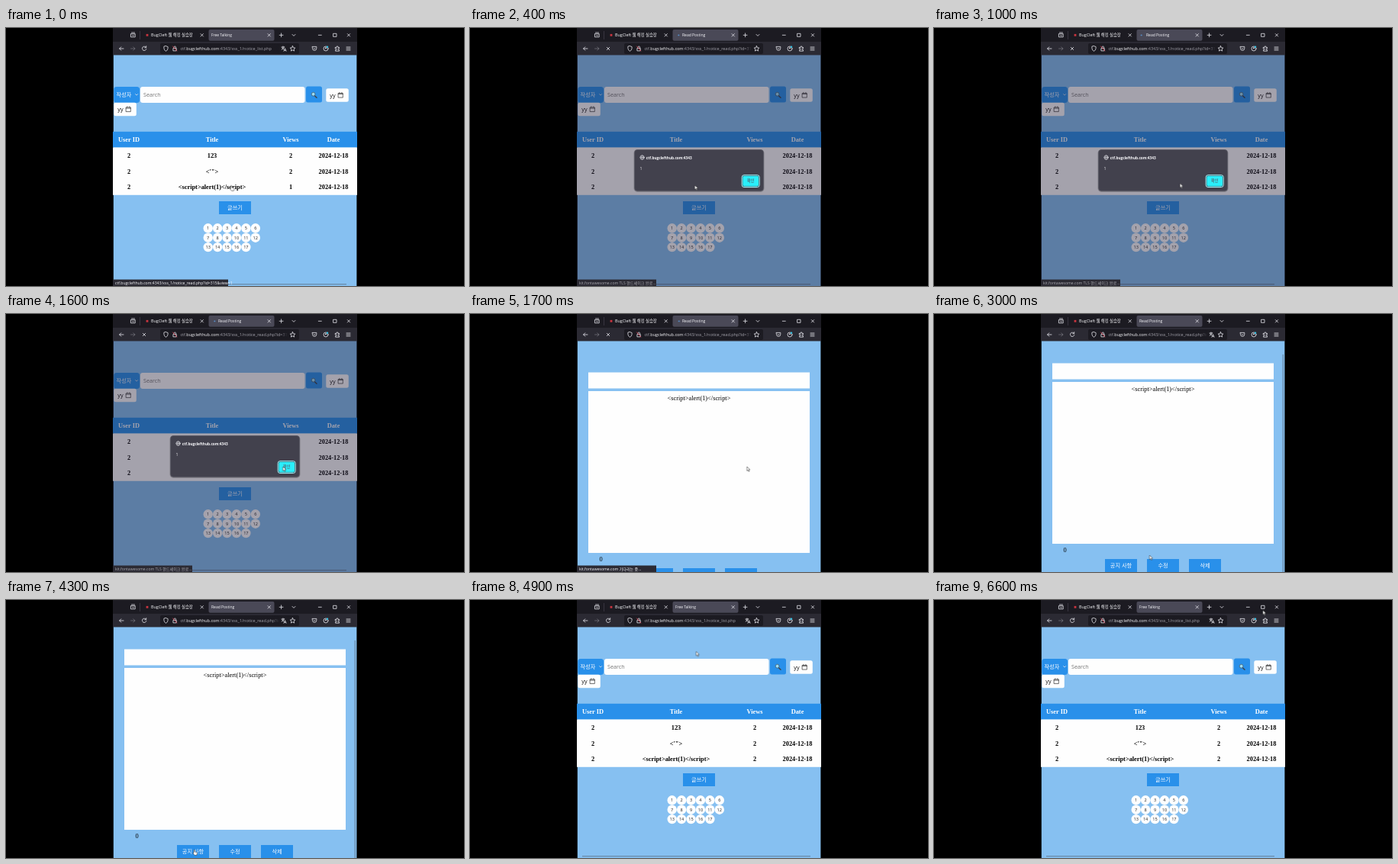
An HTML page that plays this animation: 600x338 px, repeating every 6.9 s.

```html
<!DOCTYPE html>
<html lang="ko">
<head>
<meta charset="utf-8">
<title>Free Talking</title>
<style>
html, body { margin: 0; width: 100%; height: 100%; overflow: hidden; background: #000; }
svg { display: block; width: 100vw; height: 100vh; }
text { font: 5.2px "Open Sans", "Noto Sans CJK KR", "Noto Sans CJK", sans-serif; fill: #fbfbfe; }
.mid { text-anchor: middle; }
.serif { font: 8.35px "Liberation Serif", "Times New Roman", serif; fill: #000; }
.bold { font-weight: 700; }
.head text { fill: #fff; }
.ko { font: 7.2px "Noto Sans CJK KR", "Noto Sans CJK", sans-serif; }
.field { font: 7.2px "Open Sans", sans-serif; fill: #757575; }
.num { font: 5.6px "Open Sans", sans-serif; fill: #222; }
.url { font-size: 5.47px; fill: #a5a4ad; }
.url tspan { fill: #fbfbfe; }
.status { font-size: 5.1px; }
.blue { fill: #2990ea; }
.sky { fill: #86c0f1; }
.white { fill: #fefefe; }
.bar { fill: #2b2a33; }
.dark { fill: #1c1b22; }
.line { fill: none; stroke: #e6e6ec; stroke-width: .8; stroke-linecap: round; stroke-linejoin: round; }
.pointer { fill: #fff; stroke: #222; stroke-width: .5; stroke-linejoin: round; }

/* Hard switches between browser states */
.idle, .hover, .alert, .load, .ready, .list, .read, .visit, .done, .arrow, .hand, .first, .again {
  animation: 6900ms step-end infinite;
}
.idle  { animation-name: idle; }
.hover { animation-name: hover; }
.alert { animation-name: alert; }
.load  { animation-name: load; }
.ready { animation-name: ready; }
.list  { animation-name: list; }
.read  { animation-name: read; }
.visit { animation-name: visit; }
.done  { animation-name: done; }
.arrow { animation-name: arrow; }
.hand  { animation-name: hand; }
.first { animation-name: first; }
.again { animation-name: again; }
@keyframes idle  { 0%, 71.014%, 100% { opacity: 1 } 5.797% { opacity: 0 } }
@keyframes hover { 0% { opacity: 1 } 5.797%, 100% { opacity: 0 } }
@keyframes alert { 0%, 24.638%, 100% { opacity: 0 } 5.797% { opacity: 1 } }
@keyframes load  { 0%, 30.435%, 100% { opacity: 0 } 5.797% { opacity: 1 } }
@keyframes ready { 0%, 30.435%, 100% { opacity: 1 } 5.797% { opacity: 0 } }
@keyframes list  { 0%, 71.014%, 100% { opacity: 1 } 24.638% { opacity: 0 } }
@keyframes read  { 0%, 71.014%, 100% { opacity: 0 } 24.638% { opacity: 1 } }
@keyframes visit { 0%, 71.014%, 100% { opacity: 0 } 5.797% { opacity: 1 } }
@keyframes done  { 0%, 71.014%, 100% { opacity: 0 } 30.435% { opacity: 1 } }
@keyframes first { 0% { opacity: 1 } 24.638%, 100% { opacity: 0 } }
@keyframes again { 0% { opacity: 0 } 24.638%, 100% { opacity: 1 } }
@keyframes arrow { 0%, 47.826% { opacity: 0 } 5.797%, 71.014%, 100% { opacity: 1 } }
@keyframes hand  { 0%, 47.826% { opacity: 1 } 5.797%, 71.014%, 100% { opacity: 0 } }

.scroll { animation: scroll 6900ms ease-out infinite; }
@keyframes scroll {
  0%, 33.333% { transform: none }
  37.681%, 100% { transform: translateY(-12px) }
}
.throb { animation: throb 600ms ease-in-out infinite alternate; }
@keyframes throb { from { transform: translateX(-1.5px) } to { transform: translateX(1.5px) } }

.cursor { animation: travel 6900ms ease-in-out infinite; }
@keyframes travel {
  0%, 8.696% { transform: translate(294.5px, 206px) }
  21.739%, 31.884% { transform: translate(362.8px, 200px) }
  40.58%, 43.478% { transform: translate(282.4px, 316px) }
  49.275%, 71.013% { transform: translate(246px, 327px) }
  71.014%, 75.362% { transform: translate(296.3px, 67.5px) }
  85.507%, 100% { transform: translate(430.8px, 13.5px) }
}
</style>
</head>
<body>
<svg viewBox="0 0 600 338">
  <defs>
    <clipPath id="win"><rect x="140.8" width="318.6" height="338"/></clipPath>
    <clipPath id="address"><rect x="202" y="20" width="166" height="14"/></clipPath>
    <linearGradient id="fade">
      <stop stop-color="#1c1b22" stop-opacity="0"/><stop offset="1" stop-color="#1c1b22"/>
    </linearGradient>
    <g id="date">
      <rect class="white" width="29.5" height="17.5" rx="2.5"/>
      <text class="field" x="5" y="11.6" style="fill:#111">yy</text>
      <path class="line" style="stroke:#222;stroke-width:.65" d="M16.2 6.2h5.8v5.6h-5.8zM16.2 7.3h5.8M17.6 5v1M20.6 5v1"/>
    </g>
    <path id="close" class="line" d="M-1.7-1.7 1.7 1.7M1.7-1.7-1.7 1.7"/>
  </defs>

  <rect width="600" height="338"/>
  <g clip-path="url(#win)">
    <rect class="sky" x="140" y="35" width="320" height="303"/>

    <g class="list">
      <rect class="blue" x="141.3" y="77" width="33.7" height="21" rx="3.5"/>
      <text class="ko" x="144.5" y="90.2">작성자</text>
      <path class="line" d="m169.6 86.6 1.5 1.5 1.5-1.5"/>
      <rect class="white" x="176" y="77" width="215.5" height="21" rx="3"/>
      <text class="field" x="180" y="90.3">Search</text>
      <rect class="blue" x="393" y="76.5" width="21" height="21" rx="2.5"/>
      <path d="m404.4 88.7 2.6 2.6" stroke="#3b4750" stroke-width="1.5" stroke-linecap="round"/>
      <circle cx="402.6" cy="86.7" r="2.4" fill="#9bdcf5" stroke="#46606f" stroke-width=".8"/>
      <use href="#date" x="419.3" y="79.3"/>
      <use href="#date" x="141.3" y="97.8"/>

      <rect class="blue" x="140" y="135.8" width="320" height="20.7"/>
      <rect class="white" x="140" y="156.5" width="320" height="62.3"/>
      <g id="rows"></g>

      <rect class="blue" x="279" y="227" width="42" height="17"/>
      <text class="ko mid" x="300" y="238.2">글쓰기</text>
      <g id="pages"></g>
      <rect x="147" y="335" width="299" height="1.3" fill="#6b8cab"/>
    </g>

    <g class="read">
      <g class="scroll">
        <rect class="white" x="155" y="76.5" width="290" height="21"/>
        <rect class="white" x="155" y="101" width="290" height="212"/>
        <text class="serif mid" x="300" y="112.6">&lt;script&gt;alert(1)&lt;/script&gt;</text>
        <text class="serif" x="169.4" y="323.6">0</text>
        <g id="actions"></g>
      </g>
      <rect class="done" x="456.6" y="53" width="1.3" height="285" fill="#6b8cab"/>
    </g>

    <g class="alert">
      <rect x="140" y="35" width="320" height="303" fill="#1e1b32" opacity=".4"/>
      <rect x="214.5" y="159" width="171" height="56" rx="5" opacity=".22"/>
      <rect x="215.5" y="159.5" width="169" height="54" rx="4" fill="#42414d" stroke="#555461" stroke-width=".5"/>
      <g class="line" style="stroke-width:.6">
        <circle cx="225.6" cy="169.6" r="2.7"/>
        <ellipse cx="225.6" cy="169.6" rx="1.2" ry="2.7"/>
        <path d="M223 169.6h5.2"/>
      </g>
      <text class="bold" x="230.7" y="171.5" style="font-size:4.75px">ctf.bugclefthub.com:4343</text>
      <text x="222.6" y="186">1</text>
      <rect x="356.2" y="192.7" width="23" height="15.8" rx="2.8" fill="#42414d" stroke="#a5f6fd" stroke-width="1"/>
      <rect x="357.3" y="193.8" width="20.8" height="13.6" rx="1.8" fill="#2aeefa"/>
      <text class="mid" x="367.7" y="202.4" style="fill:#5a3a48">확인</text>
    </g>

    <g class="hover">
      <rect class="bar" x="140" y="329.5" width="151" height="8.5"/>
      <text class="status" x="143" y="335.8">ctf.bugclefthub.com:4343/xss_1/notice_read.php?id=315&amp;view=1</text>
    </g>
    <g class="load">
      <rect class="bar" x="140" y="329.5" width="104" height="8.5"/>
      <text class="status alert" x="143" y="335.8" style="fill:#aaa9b0">kit.fontawesome.com TLS 핸드셰이크 완료...</text>
      <text class="status read" x="143" y="335.8">kit.fontawesome.com 기다리는 중...</text>
    </g>

    <!-- Tab strip -->
    <rect class="dark" x="140" width="320" height="18.5"/>
    <rect x="265.5" y="2" width="86" height="14.8" rx="2" fill="#4a4957"/>
    <rect x="175.3" y="4" width=".6" height="11" fill="#4a4957"/>
    <path class="line" d="M163.8 7.6h5.4v4.2h-5.4zM164.5 6h4M165.3 9.2l1.2 1.1 1.2-1.1"/>
    <rect x="183.6" y="7.9" width="2.8" height="2.8" fill="#c9343f"/>
    <text x="190" y="11.4" style="font-size:5.35px">BugCleft 웹 해킹 실습장</text>
    <use href="#close" x="256.7" y="9.3"/>
    <text class="idle" x="269" y="11.4" style="font-size:4.9px">Free Talking</text>
    <g class="visit">
      <g class="load">
        <circle class="throb" cx="272.5" cy="9.4" r=".9" fill="#5e9fe0"/>
        <text x="278" y="11.4" style="font-size:5px">Read Posting</text>
      </g>
      <text class="done" x="269" y="11.4" style="font-size:5px">Read Posting</text>
    </g>
    <use href="#close" x="344.7" y="9.3"/>
    <path class="line" d="M358.2 9.3h4.8M360.6 6.9v4.8M375 8.4l2 2 2-2M409.3 9.3h4M429 7.3h4v4h-4z"/>
    <use href="#close" x="449" y="9.3"/>

    <!-- Toolbar -->
    <rect class="bar" x="140" y="18" width="320" height="17.5"/>
    <path class="line" d="M154 27h-5.4m2.2-2.2-2.2 2.2 2.2 2.2"/>
    <path class="line" opacity=".35" d="M163.5 27h5.4m-2.2-2.2 2.2 2.2-2.2 2.2"/>
    <path class="line ready" d="M183.4 25.3a2.7 2.7 0 1 0 .4 2.2M183.7 23.7v2h-2"/>
    <use class="load" href="#close" x="181" y="27"/>
    <rect class="dark" x="202" y="20" width="182" height="14" rx="2"/>
    <path class="line" d="M209.5 23.6l2.6 1v1.8q0 2.6-2.6 4-2.6-1.4-2.6-4v-1.8z"/>
    <path class="line" d="M219.3 26.6h4v3.3h-4zM220.1 26.4v-1.2a1.2 1.2 0 0 1 2.4 0v1.2"/>
    <path class="line" style="stroke:#e8445a" d="m218.6 24 5.2 6"/>
    <g clip-path="url(#address)">
      <text class="url idle" x="228.5" y="29">ctf.<tspan>bugclefthub.com</tspan>:4343/xss_1/notice_list.php</text>
      <text class="url visit" x="228.5" y="29">ctf.<tspan>bugclefthub.com</tspan>:4343/xss_1/notice_read.php?id=315&amp;view=1</text>
      <rect class="load" x="360" y="21" width="9" height="12" fill="url(#fade)"/>
      <g class="ready">
        <rect x="349" y="21" width="9" height="12" fill="url(#fade)"/>
        <rect class="dark" x="358" y="21" width="11" height="12"/>
        <path class="line" d="M361 25h3.8M362.9 24v1M364.2 25q-.7 2.2-3 3.2M361.6 25.6q.7 1.6 2.2 2.2M364 30.3l1.5-3.6 1.5 3.6M364.5 29.3h2"/>
      </g>
    </g>
    <path class="line" d="m375.5 23.6 1 2.2 2.4.3-1.8 1.6.5 2.4-2.1-1.2-2.1 1.2.5-2.4-1.8-1.6 2.4-.3z"/>
    <path class="line" d="M401.4 24.4h5.4v2.3a2.7 2.7 0 0 1-5.4 0zM402.9 26.4l1.2 1.1 1.2-1.1"/>
    <circle class="line" cx="419" cy="27" r="3"/>
    <circle cx="419" cy="26.2" r="1" fill="#e6e6ec"/>
    <circle cx="421" cy="24.8" r="1.2" fill="#36c5e8"/>
    <path class="line" d="M431.6 25.4h1.5a1 1 0 1 1 1.8 0h1.6v1.5a1 1 0 1 0 0 1.8v1.5h-4.9v-1.6a1 1 0 1 0 0-1.8z"/>
    <path class="line" d="M446 25h5M446 27h5M446 29h5"/>
  </g>

  <g class="cursor">
    <path class="pointer arrow" d="M0 0v5.6l1.3-1.2 1 2.1.9-.4-1-2.1h1.9z"/>
    <path class="pointer hand" d="M0 .6q.6-.9 1.2 0v2.3l2.6.6q.8.3.6 1.1l-.5 2.7h-3L-1.2 4.6q.3-.8 1.2-.2z"/>
  </g>
</svg>
<script>
const fill = (id, parts) => { document.getElementById(id).innerHTML = parts.join(''); };
const label = (cls, x, y, s) =>
  `<text class="${cls} mid" x="${x}" y="${y}">${s.replace(/</g, '&lt;').replace(/>/g, '&gt;')}</text>`;

const columns = [161, 270, 373, 429];
const row = (cells, y) => cells.map((s, i) => s && label('serif bold', columns[i], y, s)).join('');
const day = '2024-12-18';
fill('rows', [
  `<g class="head">${row(['User ID', 'Title', 'Views', 'Date'], 149)}</g>`,
  row(['2', '123', '2', day], 170),
  row(['2', '<\'">', '2', day], 190.6),
  row(['2', '<script>alert(1)<\/script>', '', day], 211.3),
  label('serif bold first', 373, 211.3, '1'),
  label('serif bold again', 373, 211.3, '2')
]);

fill('pages', Array.from({ length: 17 }, (_, i) => {
  const x = 264.7 + i % 6 * 12.42, y = 262.3 + Math.floor(i / 6) * 12.4;
  return `<circle class="white" cx="${x}" cy="${y}" r="6.2"/>` + label('num', x, y + 2, String(i + 1));
}));

fill('actions', ['공지 사항', '수정', '삭제'].map((s, i) => {
  const x = 224 + i * 55;
  return `<rect class="blue" x="${x}" y="333" width="42" height="17"/>` + label('ko', x + 21, 344.2, s);
}));
</script>
</body>
</html>
```
